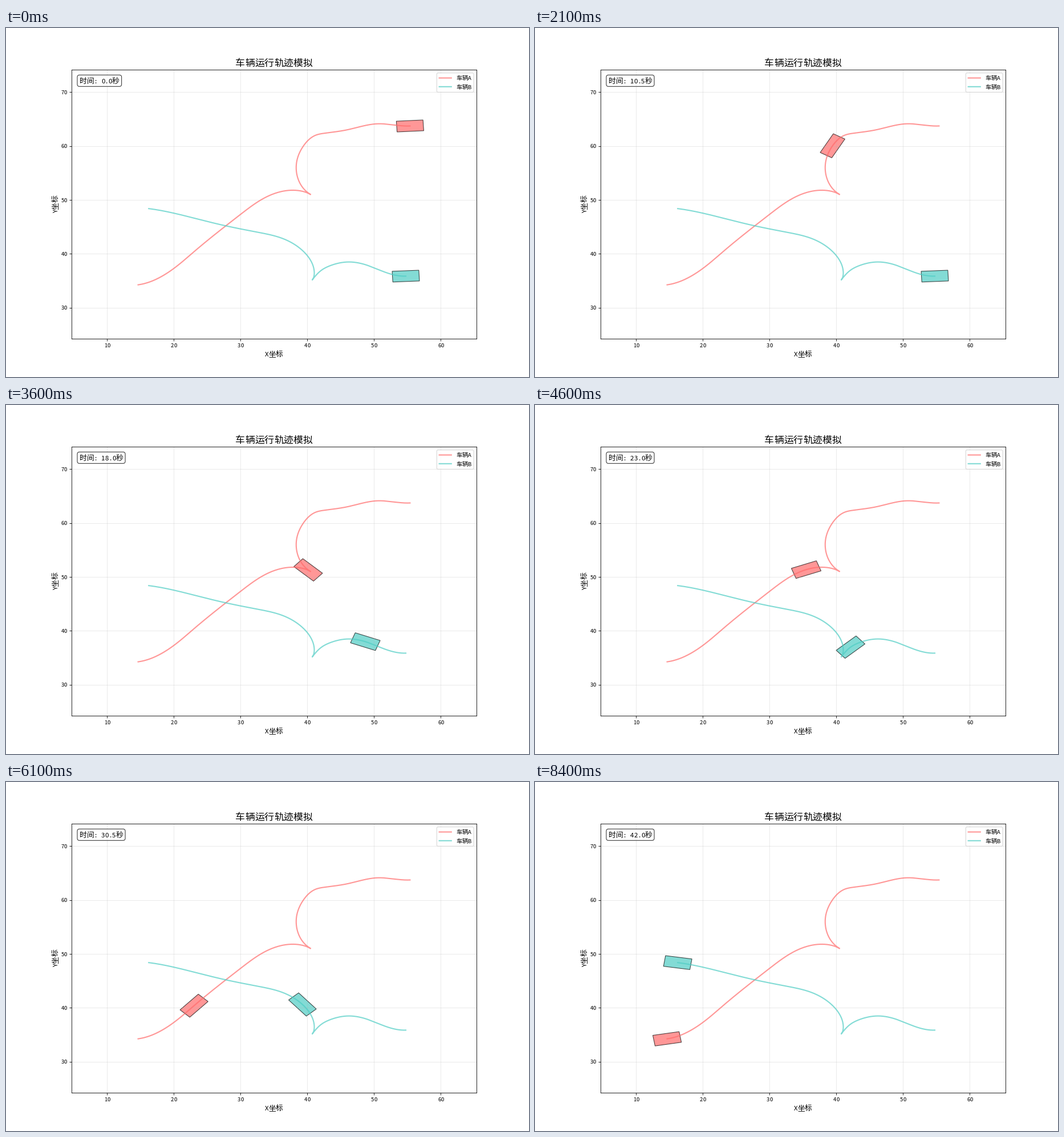
A matplotlib script that plays this animation: 917 by 611 pixels, repeating every 8.5 s.

```python
import numpy as np
import matplotlib.pyplot as plt
from matplotlib.animation import FuncAnimation
from matplotlib.lines import Line2D
from matplotlib.patches import FancyBboxPatch, Polygon
from matplotlib.transforms import Affine2D

W, H, DPI = 917, 611, 76.4
FRAMES, INTERVAL = 85, 100
RED, TEAL = "#FF6B6B", "#4ECDC4"

plt.rcParams["font.family"] = "Noto Sans CJK JP"
fig = plt.figure(figsize=((W + 0.01) / DPI, (H + 0.01) / DPI), dpi=DPI)
ax = fig.add_axes([0.125, 0.11, 0.775, 0.77])
ax.set_xlim(4.64, 65.37)
ax.set_ylim(24.28, 74.14)
ax.set_xticks(range(10, 61, 10))
ax.set_yticks(range(30, 71, 10))
ax.tick_params(labelbottom=False, labelleft=False)
ax.grid(True, alpha=0.3)

# stage pixels, y pointing down
stage = Affine2D().scale(1 / W, -1 / H).translate(0, 1) + fig.transFigure
to_data = stage + ax.transData.inverted()
to_stage = to_data.inverted()


def em(size):
    return size * DPI / 72


def is_wide(ch):
    return ord(ch) > 0x2E80


def width(s, size):
    return sum(em(size) * (1 if is_wide(c) else 0.5) for c in s)


def label(x, y, s, size, up=False, align=0):
    """Full-width and half-width characters; align 0 left, 0.5 centre, 1 right."""
    out, run = [], -align * width(s, size)
    for ch in s:
        w = width(ch, size)
        mid = run + (0.2 * em(size) if ch in ".:" else w / 2)
        run += w
        if ch == " ":
            continue
        pos = (x, y - mid) if up else (x + mid, y)
        out.append(fig.text(*pos, ch, transform=stage, ha="center",
                            va="baseline", rotation=90 if up else 0,
                            rotation_mode="anchor",
                            fontsize=size if is_wide(ch) else size * 0.9))
    return out


def box(x, y, w, h, pad, radius, edge):
    shape = f"round,pad={pad},rounding_size={radius}"
    return fig.add_artist(FancyBboxPatch(
        (x, y), w, h, boxstyle=shape, transform=stage, facecolor="white",
        edgecolor=edge, lw=1, alpha=0.8))


def spline(t, p, m0, m1, q):
    """Cubic spline through p at t with end slopes m0 and m1, taken at q."""
    h, k = np.diff(t), len(t)
    d = np.diff(p, axis=0) / h[:, None]
    mat, rhs = np.eye(k), np.zeros(p.shape)
    rhs[0], rhs[-1] = m0, m1
    for i in range(1, k - 1):
        mat[i, i - 1:i + 2] = h[i], 2 * (h[i - 1] + h[i]), h[i - 1]
        rhs[i] = 3 * (h[i] * d[i - 1] + h[i - 1] * d[i])
    m = np.linalg.solve(mat, rhs)
    i = np.clip(np.searchsorted(t, q, side="right") - 1, 0, k - 2)
    g = h[i][:, None]
    u = (q - t[i])[:, None] / g
    return ((1 + 2 * u) * (1 - u) ** 2 * p[i] + u * (1 - u) ** 2 * g * m[i]
            + u * u * (3 - 2 * u) * p[i + 1] + u * u * (u - 1) * g * m[i + 1])


def heading(deg):
    a = np.radians(deg)
    return np.cos(a), np.sin(a)


def lengths(p):
    return np.concatenate([[0], np.cumsum(np.hypot(*np.diff(p, axis=0).T))])


class Leg:
    """A drive from rest to rest through (frame, x, y) keys."""

    def __init__(self, start, end, *keys):
        when, xs, ys = np.array(keys, float).T
        knots = to_data.transform(np.column_stack([xs, ys]))
        t = lengths(knots)
        q = np.linspace(0, t[-1], 500)
        self.path = spline(t, knots, heading(start), heading(end), q)
        self.arc = lengths(self.path)
        dx, dy = np.gradient(self.path, axis=0).T
        self.angle = np.unwrap(np.arctan2(dy, dx))
        self.when = when
        self.gone = np.interp(t, q, self.arc)[:, None]

    def pose(self, k):
        k = np.clip([k], self.when[0], self.when[-1])
        s = spline(self.when, self.gone, 0, 0, k)[0, 0]
        return [np.interp(s, self.arc, c) for c in (*self.path.T, self.angle)]


class Car:
    """A car that drives one leg, changes gear and drives another."""

    def __init__(self, color, *legs):
        self.legs = legs
        track = np.concatenate([leg.path for leg in legs])
        ax.plot(*track.T, color=color, lw=2, alpha=0.7)
        self.body = ax.add_patch(Polygon(np.zeros((4, 2)), facecolor=color,
                                         edgecolor="black", lw=1, alpha=0.7))

    def place(self, k):
        first, second = self.legs
        x, y, a = (second if k >= second.when[0] else first).pose(k)
        c, s = np.cos(a), np.sin(a)
        corners = np.array([(-2, -1), (2, -1), (2, 1), (-2, 1)])
        self.body.set_xy(corners @ np.array([[c, s], [-s, c]]) + (x, y))


car_a = Car(
    RED,
    Leg(183.5, -37, (0, 708.4, 171.5), (7.5, 652, 167.7), (12.4, 598, 178.3),
        (15.7, 560, 184), (17.2, 544, 187.3), (21, 521.7, 206.2),
        (27.5, 508.8, 246), (36, 529.8, 288.7), (37.6, 534, 291.5)),
    Leg(143, 189.5, (37.6, 534, 291.5), (42.9, 504, 284), (46, 475.5, 288.2),
        (52.5, 412, 325.7), (61, 329.7, 391.6), (66, 280, 430.7),
        (73.5, 231.6, 449.6)))

car_b = Car(
    TEAL,
    Leg(183, 238, (27, 701, 434.4), (31.7, 668, 428.7), (36, 630, 414.3),
        (39.3, 601, 409.6), (43, 572, 414.8), (46, 553.3, 423.9),
        (50.3, 537, 441)),
    Leg(58, 171.3, (50.3, 537, 441), (54, 540.5, 427.5), (61, 519.8, 389.5),
        (66.2, 485, 368.5), (69.7, 440, 357.3), (74, 376.2, 344.3),
        (79.1, 300, 325.5), (84, 250.2, 316.2)))

# titles and tick labels
mid_x, mid_y = 0.5125 * W, 0.505 * H
label(mid_x, 67, "车辆运行轨迹模拟", 16, align=0.5)
label(mid_x, 574.8, "X坐标", 12, align=0.5)
label(90.8, mid_y, "Y坐标", 12, up=True, align=0.5)
for v in ax.get_xticks():
    label(to_stage.transform((v, 30))[0], 559, str(int(v)), 10, align=0.5)
for v in ax.get_yticks():
    y = to_stage.transform((10, v))[1]
    label(107.2, y + 3.5, str(int(v)), 10, align=1)

# legend
box(755.3, 78.7, 64.7, 33.7, 0, 2.1, "0.8")
for y, color, name in ((87.5, RED, "车辆A"), (102.8, TEAL, "车辆B")):
    fig.add_artist(Line2D([759.6, 780.8], [y, y], color=color, lw=2,
                          alpha=0.7, transform=stage, zorder=2, snap=False))
    label(789.3, y + 3.8, name, 10)

clock_x, clock_y = 128.8, 96.8
clock_box = box(clock_x, 86.1, 70, 12.4, 3.82, 3.82, "black")
clock = []


def draw(k):
    car_a.place(k)
    car_b.place(k)
    for t in clock:
        t.remove()
    text = f"时间: {k * 0.5:.1f}秒"
    clock[:] = label(clock_x, clock_y, text, 12)
    clock_box.set_width(width(text, 12))
    return [car_a.body, car_b.body, clock_box, *clock]


anim = FuncAnimation(fig, draw, frames=FRAMES, interval=INTERVAL,
                     init_func=lambda: draw(0), repeat=True, repeat_delay=0)
plt.show()
```
